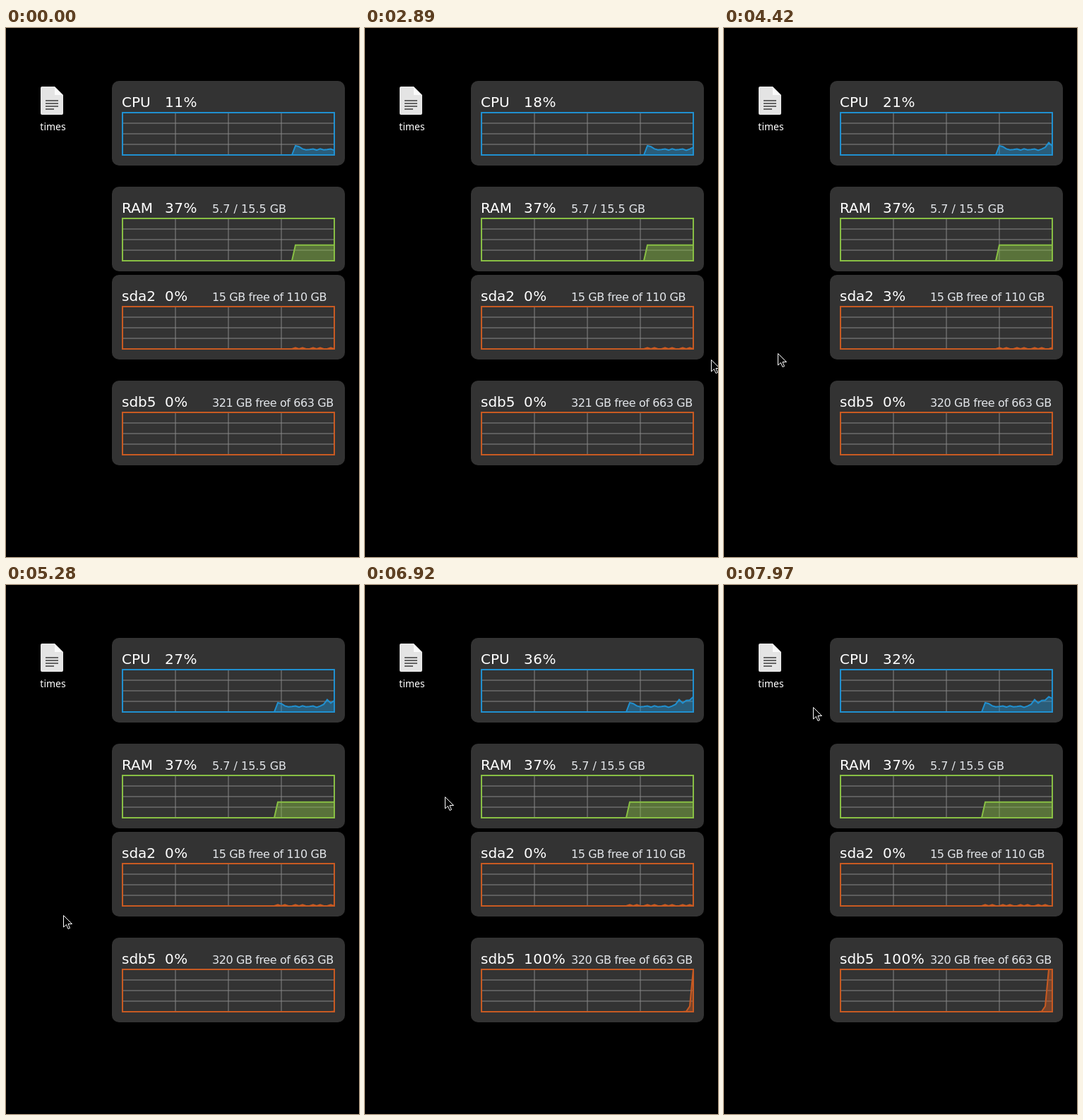
Write an HTML page with a canvas that moves like this. It is 500 px wide and 750 px high and loops after 8 s.

```html
<!DOCTYPE html>
<html lang="en">
<head>
<meta charset="utf-8">
<title>System monitor</title>
<style>
html, body { margin: 0; width: 100%; height: 100%; overflow: hidden; background: #000; }
canvas { display: block; }
</style>
</head>
<body>
<canvas id="stage" width="500" height="750"></canvas>
<script>
const ctx = document.getElementById('stage').getContext('2d');
const LOOP = 8000;
const SANS = '"DejaVu Sans", Verdana, sans-serif';
const START = 13; // samples present at time 0

// CPU readings shown as text, one per tick
const cpuReadings = [11, 14, 18, 29, 21, 27, 28, 36, 32];

// load(i): percentage of sample i, counted from the first one
const panels = [
  { y: 75, name: 'CPU', color: '#2090d0', detail: () => '',
    load: i => cpuReadings[i - START + 1] ?? (i && 13 + 1.5 * Math.sin(2.5 * i) + (i < 3 ? 8 : 0)) },
  { y: 225, name: 'RAM', color: '#88bf44', spacing: 0, detail: () => '5.7 / 15.5 GB',
    load: i => i && 37 },
  { y: 350, name: 'sda2', color: '#c85a22', detail: () => '15 GB free of 110 GB',
    load: i => i % 5 % 2 * 3 },
  { y: 500, name: 'sdb5', color: '#c85a22', detail: tick => (tick < 3 ? 321 : 320) + ' GB free of 663 GB',
    load: i => Math.min(100, 13 * 16 ** (i - 18)) }
];

// Pointer path: time, x, y
const path = [
  [2890, 490, 470], [3450, 76, 452], [4420, 76, 461], [5280, 81, 468],
  [6080, 101, 544], [6920, 113, 300], [7600, 129, 149], [7970, 126, 173]
];

function text(str, x, y, font, color, spacing = 0) {
  ctx.font = font;
  ctx.fillStyle = color;
  ctx.letterSpacing = spacing + 'px';
  ctx.fillText(str, x, y);
}

function polygon(points, x = 0, y = 0) {
  ctx.beginPath();
  points.forEach(([px, py]) => ctx.lineTo(x + px, y + py));
  ctx.closePath();
}

function drawIcon() {
  ctx.fillStyle = '#e4e4e4';
  ctx.beginPath();
  ctx.roundRect(49, 83, 32, 40, 2);
  ctx.fill();
  ctx.fillStyle = '#000';
  ctx.fillRect(69, 83, 12, 12);
  ctx.fillStyle = '#fafafa';
  polygon([[69, 83], [81, 95], [69, 95]]);
  ctx.fill();
  ctx.fillStyle = '#666';
  for (let i = 0; i < 4; i++) ctx.fillRect(56, 102 + i * 4, i < 3 ? 18 : 12, 2);
  ctx.textAlign = 'center';
  text('times', 66.5, 145, '14px "Noto Sans", "Open Sans", sans-serif', '#fff');
  ctx.textAlign = 'left';
}

function drawPanel({ y, name, color, load, detail, spacing = -0.4 }, tick) {
  const last = START - 1 + tick;
  const left = 165, right = 465, top = y + 45, base = y + 105;

  ctx.fillStyle = '#333';
  ctx.beginPath();
  ctx.roundRect(150, y, 330, 120, 10);
  ctx.fill();

  text(name, 164, y + 37, '20px ' + SANS, '#fff');
  text(Math.floor(load(last)) + '%', 225, y + 37, '20px ' + SANS, '#fff', 0.5);
  text(detail(tick), 292, y + 37, '16px ' + SANS, '#e2e5e9', spacing);

  ctx.beginPath();
  for (let i = 1; i < 4; i++) {
    ctx.moveTo(left, top + i * 15);
    ctx.lineTo(right, top + i * 15);
    ctx.moveTo(left + i * 75, top);
    ctx.lineTo(left + i * 75, base);
  }
  ctx.lineWidth = 1;
  ctx.strokeStyle = '#888';
  ctx.stroke();

  const points = Array.from({ length: last + 1 },
    (_, i) => [right - (last - i) * 5, base - load(i) * 0.6]);
  polygon([...points, [right, base]]);
  ctx.fillStyle = color;
  ctx.globalAlpha = 0.45;
  ctx.fill();
  ctx.globalAlpha = 1;

  ctx.lineWidth = 2;
  ctx.strokeStyle = color;
  ctx.beginPath();
  points.forEach(p => ctx.lineTo(...p));
  ctx.stroke();
  ctx.strokeRect(left, top, right - left, base - top);
}

function pointerAt(t) {
  const i = path.findIndex(key => key[0] > t);
  if (i < 0) return path.at(-1).slice(1);
  const [t0, x0, y0] = path[i - 1];
  const [t1, x1, y1] = path[i];
  const p = (t - t0) / (t1 - t0);
  const ease = p * p * (3 - 2 * p);
  return [x0 + (x1 - x0) * ease, y0 + (y1 - y0) * ease].map(Math.round);
}

function drawPointer(t) {
  if (t < path[0][0]) return;
  const [x, y] = pointerAt(t);
  polygon([[0, 0], [0, 16.5], [4, 13], [6.5, 19], [9, 18], [6.5, 12], [12, 12]], x + 0.5, y + 0.5);
  ctx.fillStyle = '#000';
  ctx.fill();
  ctx.lineWidth = 1;
  ctx.strokeStyle = '#fff';
  ctx.stroke();
}

function draw(now) {
  const t = now % LOOP;
  const tick = Math.floor((t - 12) / 986);
  ctx.fillStyle = '#000';
  ctx.fillRect(0, 0, 500, 750);
  drawIcon();
  panels.forEach(panel => drawPanel(panel, Math.max(0, tick)));
  drawPointer(t);
}

let begin;
function frame(now) {
  begin ??= now;
  draw(now - begin);
  requestAnimationFrame(frame);
}
draw(0);
requestAnimationFrame(frame);
</script>
</body>
</html>
```
